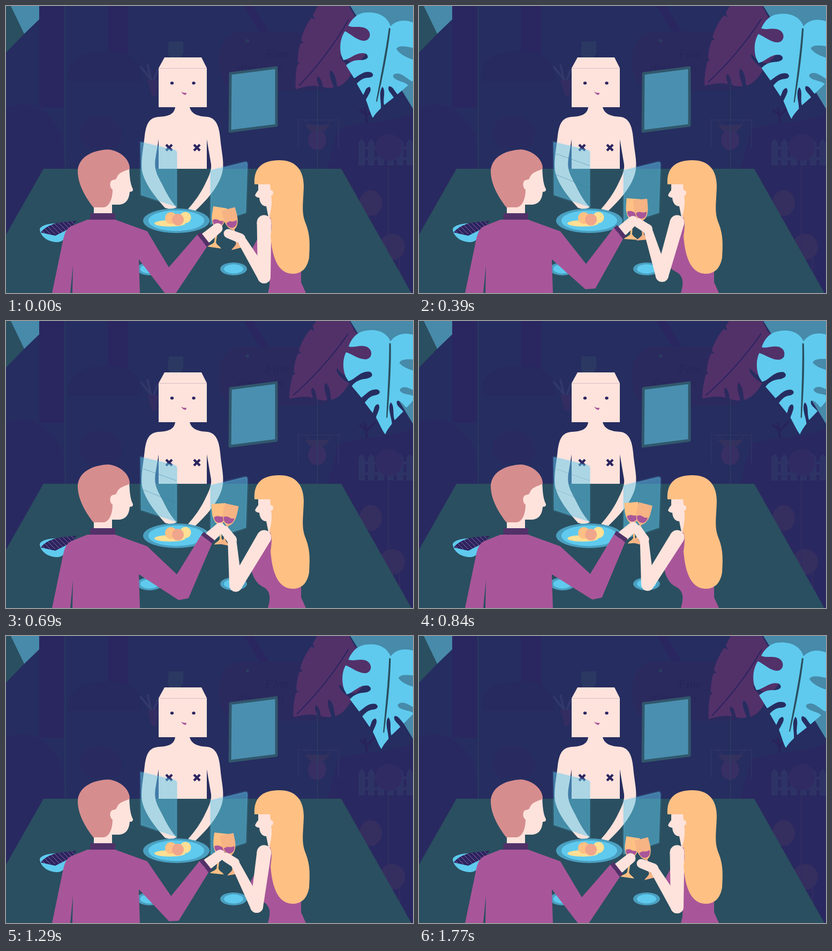
These frames come from a looping animation (760x536 px, 1.8 s). An HTML page with a canvas:

```html
<!DOCTYPE html>
<html lang="en">
<head>
<meta charset="utf-8">
<title>Dinner toast</title>
<style>
html, body { margin: 0; width: 760px; height: 536px; overflow: hidden; background: #262b60; }
canvas { display: block; }
</style>
</head>
<body>
<canvas width="760" height="536"></canvas>
<script>
const ctx = document.querySelector('canvas').getContext('2d');
const LOOP = 1800, STEP = 30;
const NAVY = '#2b2460', TEAL = '#2a4f60', SKIN = '#fee3dc', PURPLE = '#a85699',
  PLUM = '#523169', ORANGE = '#ffc084', CYAN = '#5fcaee', BEAM = '#478aa9';

// Each pose: inner elbow, cuff top, cuff bottom, outer elbow x2 (man); elbow, wrist, grip (woman);
// grip (man); rim and foot of his glass, rim and foot of hers; angle of the purple leaf.
const poses = [
  [304,488, 357,427, 375,450, 298,538, 316,538, 482,506, 438,434, 415,425, 395,415, 400,376, 389,451, 415,379, 434,454, 0],
  [308,486, 361,421, 378,442, 304,533, 322,532, 469,505, 427,424, 411,414, 400,409, 402,369, 394,442, 412,371, 427,447, 1.6],
  [315,478, 365,408, 383,429, 316,526, 335,524, 442,501, 427,412, 407,398, 399,395, 399,352, 397,428, 415,353, 413,430, 4.2],
  [320,472, 364,398, 385,412, 324,520, 342,516, 426,491, 420,408, 408,389, 400,384, 396,338, 403,413, 424,341, 404,415, 5]
];
const times = [0, 240, 510, 790, 1055, 1305, 1680, LOOP];
const order = [0, 1, 2, 3, 2, 1, 0, 0];

// Smooth monotone interpolation through the poses
function poseAt(t) {
  let i = 0;
  while (i < times.length - 2 && t >= times[i + 1]) i++;
  const span = times[i + 1] - times[i], u = (t - times[i]) / span;
  return poses[0].map((_, k) => {
    const v = j => poses[order[j]][k];
    const slope = j => (v(j + 1) - v(j)) / (times[j + 1] - times[j]);
    const tangent = j => {
      if (j === 0 || j === times.length - 1) return 0;
      const a = slope(j - 1), b = slope(j);
      return a * b <= 0 ? 0 : 2 * a * b / (a + b);
    };
    const a = v(i), b = v(i + 1), w = 1 - u;
    return a * w * w * (1 + 2 * u) + b * u * u * (3 - 2 * u)
      + span * u * w * (tangent(i) * w - tangent(i + 1) * u);
  });
}

function fill(color, d) {
  ctx.fillStyle = color;
  ctx.fill(new Path2D(d));
}
function line(color, width, d) {
  ctx.strokeStyle = color;
  ctx.lineWidth = width;
  ctx.stroke(new Path2D(d));
}
function oval(color, x, y, rx, ry = rx) {
  ctx.fillStyle = color;
  ctx.beginPath();
  ctx.ellipse(x, y, rx, ry, 0, 0, 7);
  ctx.fill();
}
const poly = (color, ...pts) => fill(color, 'M' + pts.map(p => p.join(' ')).join('L') + 'Z');

// Tapered limb with round ends
function limb(color, [ax, ay], ra, [bx, by], rb) {
  const a = Math.atan2(by - ay, bx - ax) + Math.PI / 2, c = Math.cos(a), s = Math.sin(a);
  oval(color, ax, ay, ra);
  oval(color, bx, by, rb);
  poly(color, [ax + c * ra, ay + s * ra], [bx + c * rb, by + s * rb],
    [bx - c * rb, by - s * rb], [ax - c * ra, ay - s * ra]);
}
function turned(x, y, deg, draw) {
  ctx.save();
  ctx.translate(x, y);
  ctx.rotate(deg * Math.PI / 180);
  ctx.translate(-x, -y);
  draw();
  ctx.restore();
}

function room() {
  ctx.fillStyle = '#262d60';
  ctx.fillRect(0, 0, 760, 536);
  fill('#292961', 'M0 190C40 175 75 185 105 240L110 304H70L0 427Z');
  fill('#2a2760', 'M62 0h46v190h-46ZM190 0h38v90h-38ZM444 0h18l30 50h-18Z');
  fill('#262a5f', 'M118 140C112 100 140 84 190 84C235 84 256 105 254 140Z');
  fill('#292a60', 'M140 250C130 215 160 200 185 206C220 214 225 250 205 265H150Z');
  fill('#2a2860', 'M620 230C660 215 720 220 760 200V536H750L626 304H600Z');
  fill('#2b2a5f', 'M432 48H585Q605 48 605 70V135Q605 158 580 158H432Q398 152 398 103Q398 58 432 48Z');
  oval('#2a3d61', 451, 65, 3);
  ctx.fillStyle = '#272659';
  ctx.font = 'italic 24px "Liberation Serif", serif';
  ctx.fillText('Fine', 484, 97);
  ctx.fillText('dining in', 432, 124);
  fill('#2b3962', 'M304 66H331V88L326 96H306L302 88Z');
  line('#32386a', 4, 'M272 142L264 109M273 140L251 113M274 142L284 118');
  fill('#332d62', 'M264 138H286L280 168H272Z');
  line('#2d3263', 2, 'M546 210V265M621 210V265M546 213H621M558 213L574 230M608 213L592 230');
  oval('#382f64', 581, 250, 17, 19);
  fill('#34315f', 'M558 222H605L594 234H568Z');
  line('#29235b', 4, 'M674 218L670 190M674 205L690 188M674 204L660 194');
  for (let x = 658; x < 760; x += 18) fill('#2e3366', `M${x} 298V255l6 -7l6 7V298Z`);
  line('#2e3366', 5, 'M658 265H760M658 285H760');
  oval('#302c63', 715, 264, 25);
  oval('#352f60', 681, 368, 21, 24);
  oval('#352f60', 721, 450, 24);
  line('#322d60', 2, 'M714 300V536M735 470V536');
  line('#2a4460', 1, 'M110.5 0V304M581.5 140V304');
  fill(TEAL, 'M0 0H12L34 52L0 87Z');
  fill(BEAM, 'M9 0H62V25L34 52Z');
  fill(BEAM, 'M643 0H760V192Z');
  fill(TEAL, 'M70 304H626L757 536H0V427Z');
}

function host() {
  fill(SKIN, 'M296 96H365L375 116V189H343C347 204 362 206 376 207C392 209 398 224 400 246' +
    'C402 270 407 288 405 304C402 331 379 359 353 383L340 379C352 366 363 350 370 336' +
    'C379 318 384 308 383 296L375 249V304H285V249L279 285C276 306 283 316 291 332' +
    'C300 350 308 365 319 376L308 380L297 377C278 356 259 332 254 308' +
    'C251 290 257 262 259 242C262 220 267 208 286 207C302 206 314 203 316 189H285V116Z');
  line('#d5bcc4', 1, 'M285 116.5H375');
  oval(NAVY, 310, 144, 3.2, 2.7);
  oval(NAVY, 350.5, 144, 3.2, 2.7);
  fill(PURPLE, 'M327 160Q332 163 337 162Q337 166 334 166Q330 165 327 160Z');
  for (const x of [304, 356]) line(NAVY, 4.5, `M${x - 5} 259l11 11m0 -11l-11 11`);
}

function panels(t) {
  const glow = 'rgba(95,202,238,.5)', edge = 'rgba(95,202,238,.13)';
  ctx.lineJoin = 'round';
  const upper = 'M419 126L505 115V223L418 234Z';
  fill('#4a8fb0', upper);
  line('#31576c', 5, upper);
  for (const d of ['M251 254L314 269Q319 270 319 275V375L252 353Z',
    'M382 307L447 291Q451 291 451 296L448 386L382 408Z']) {
    fill(glow, d);
    line(edge, 4, d);
  }
  ctx.globalAlpha = .55 * Math.max(0, Math.sin(Math.PI * (t - 120) / 860));
  line('#347ca5', 1, 'M256 276L318 298M256 315L318 340');
  ctx.globalAlpha = 1;
}

function dish(x, y, rx, ry, k) {
  oval('#4a9fc0', x, y, rx, ry);
  oval(CYAN, x, y, rx * k, ry * k);
}
function food() {
  dish(318, 401, 62, 23, .84);
  dish(268, 491, 24, 12, .72);
  dish(425, 491, 25, 12, .72);
  oval('#ffdf94', 306, 406, 29, 6);
  oval('#ffdf94', 335, 395, 10.5);
  oval(ORANGE, 308, 396, 11);
  oval('#f0a68c', 321, 399, 11);
  fill(CYAN, 'M63 418C66 433 80 441 97 441Q112 439 124 414C105 400 62 406 63 418Z');
  const heap = 'M65 423C72 412 92 404 112 403L132 401L122 414L92 429Z';
  fill(NAVY, heap);
  ctx.save();
  ctx.clip(new Path2D(heap));
  for (let x = 50; x < 140; x += 9) line('#956c9a', 1, `M${x} 402l24 24`);
  ctx.restore();
}

function glass(color, [x, y], [fx, fy]) {
  ctx.save();
  ctx.translate(x, y);
  ctx.rotate(Math.atan2(x - fx, fy - y));
  fill(color, 'M-13 0H13C13 10 14 20 11 28C9 35 5 38 1.7 40V66C4 71 10 72 13 76H-13' +
    'C-10 72 -4 71 -1.7 66V40C-5 38 -9 35 -11 28C-14 20 -13 10 -13 0Z');
  fill(PURPLE, 'M-10 25Q-4 22 0 24T10 24C10 32 5 36 0 36C-5 36 -10 32 -10 25Z');
  ctx.restore();
}

function woman(elbow, wrist, grip) {
  fill(PURPLE, 'M492 390L481 414L457 458C460 480 470 492 481 497C495 505 494 520 489 536H560L551 516V480L510 400Z');
  fill(SKIN, 'M471 331V344Q466 350 465 354Q468 358 473 358C474 370 480 374 486 374L490 394L510 400V331Z');
  limb(SKIN, [482, 404], 13.5, elbow, 12);
  limb(SKIN, elbow, 12, wrist, 8);
  limb(SKIN, wrist, 9, grip, 8.5);
  fill(ORANGE, 'M464 333C462 302 479 288 510 288C541 288 556 306 556 337C555 370 551 386 560 407' +
    'C569 430 567 450 566 470C562 492 550 501 533 500C507 498 497 468 494 430' +
    'C497 410 497 400 492 392C496 378 497 364 495 354L493 333Z');
  oval(SKIN, 495, 349, 4, 5);
}

function man(inner, top, bottom, out1, out2, grip) {
  const dx = bottom[0] - top[0], dy = bottom[1] - top[1], k = 8 / Math.hypot(dx, dy);
  const ahead = ([x, y]) => [x + dy * k, y - dx * k];
  limb(SKIN, [(top[0] + bottom[0]) / 2 + 8, (top[1] + bottom[1]) / 2 - 6], 10.5, grip, 9.5);
  poly(PLUM, top, bottom, ahead(bottom), ahead(top));
  poly(PURPLE, [230, 409], [264, 421], inner, top, bottom, out2, out1, [248, 473]);
  fill(PURPLE, 'M152 399H204L264 421L248 474L250 536H86L107 435Q111 416 122 411Z');
  fill(TEAL, 'M125 484L124 536H120Z');
  fill(SKIN, 'M164 368L200 308L230 300C231 316 231 330 237 342Q238 347 231 347C230 360 225 370 211 371H198V388H164Z');
  fill('#d68d8e', 'M163 376C150 359 133 333 134 306C137 280 164 269 191 268C214 270 232 288 231 304' +
    'C221 309 211 310 207 320C205 326 202 323 198 326C193 331 194 340 199 343C199 360 193 374 183 376Z');
  oval(SKIN, 200, 333, 5.5, 8);
  fill(PLUM, 'M158 387H204V399H157Z');
}

function leaves(purpleTurn, cyanTurn) {
  turned(655, 10, purpleTurn, () => {
    fill(PLUM, 'M541 155C540 140 541 124 544 110C556 104 568 108 576 116C564 119 552 113 545 104' +
      'C545 92 546 82 550 70C566 66 582 70 591 79C576 84 562 76 551 64' +
      'C554 50 561 34 570 22C580 28 596 27 602 37C592 42 580 34 573 17' +
      'L585 -6L640 0L652 20L690 40C688 66 674 90 657 107C646 108 636 102 625 91' +
      'C621 97 636 112 650 117C642 134 632 147 619 151C616 140 616 126 606 120' +
      'C601 128 609 142 612 152C605 154 598 153 592 151C590 142 588 134 582 131' +
      'C578 138 583 144 585 150C568 147 555 152 541 155Z');
    line(NAVY, 2, 'M547 149C575 120 612 75 640 25');
  });
  turned(718, 37, cyanTurn, () => {
    fill(CYAN, 'M718 38C712 17 690 9 666 13C654 16 645 25 639 37C650 42 664 35 675 44' +
      'C683 51 680 65 668 65C655 64 645 53 633 47C625 58 622 76 626 92L630 101' +
      'C643 100 655 84 672 89C681 96 672 102 660 101C648 101 640 106 635 111L650 135' +
      'C660 130 668 120 682 124C689 129 684 134 676 134C666 134 660 140 655 145L667 166' +
      'C671 160 671 152 679 151C684 156 678 164 672 175C677 188 680 200 685 209' +
      'C688 203 694 197 700 191C701 180 695 160 703 151C710 158 703 174 706 185L724 171' +
      'C720 163 711 158 715 150C722 149 725 158 731 165L751 148' +
      'C744 140 722 140 723 129C734 120 746 134 758 141C770 130 778 115 780 104' +
      'C762 103 736 93 729 80C733 72 750 74 786 86C787 65 779 42 765 33C744 23 728 27 718 38Z');
    fill(TEAL, 'M715 41L718 42C713 85 704 130 693 179L691 178C699 135 709 85 715 41Z');
  });
}

function frame(now) {
  const t = Math.floor(now / STEP) * STEP % LOOP;
  const pose = poseAt(t), at = i => pose.slice(2 * i, 2 * i + 2);
  room();
  host();
  panels(t);
  food();
  glass(ORANGE, at(9), at(10));
  glass('#f6b384', at(11), at(12));
  woman(at(5), at(6), at(7));
  man(at(0), at(1), at(2), at(3), at(4), at(8));
  leaves(pose[26], -4.4 * (1 - Math.cos(2 * Math.PI * t / LOOP)));
  requestAnimationFrame(frame);
}
requestAnimationFrame(frame);
</script>
</body>
</html>
```
